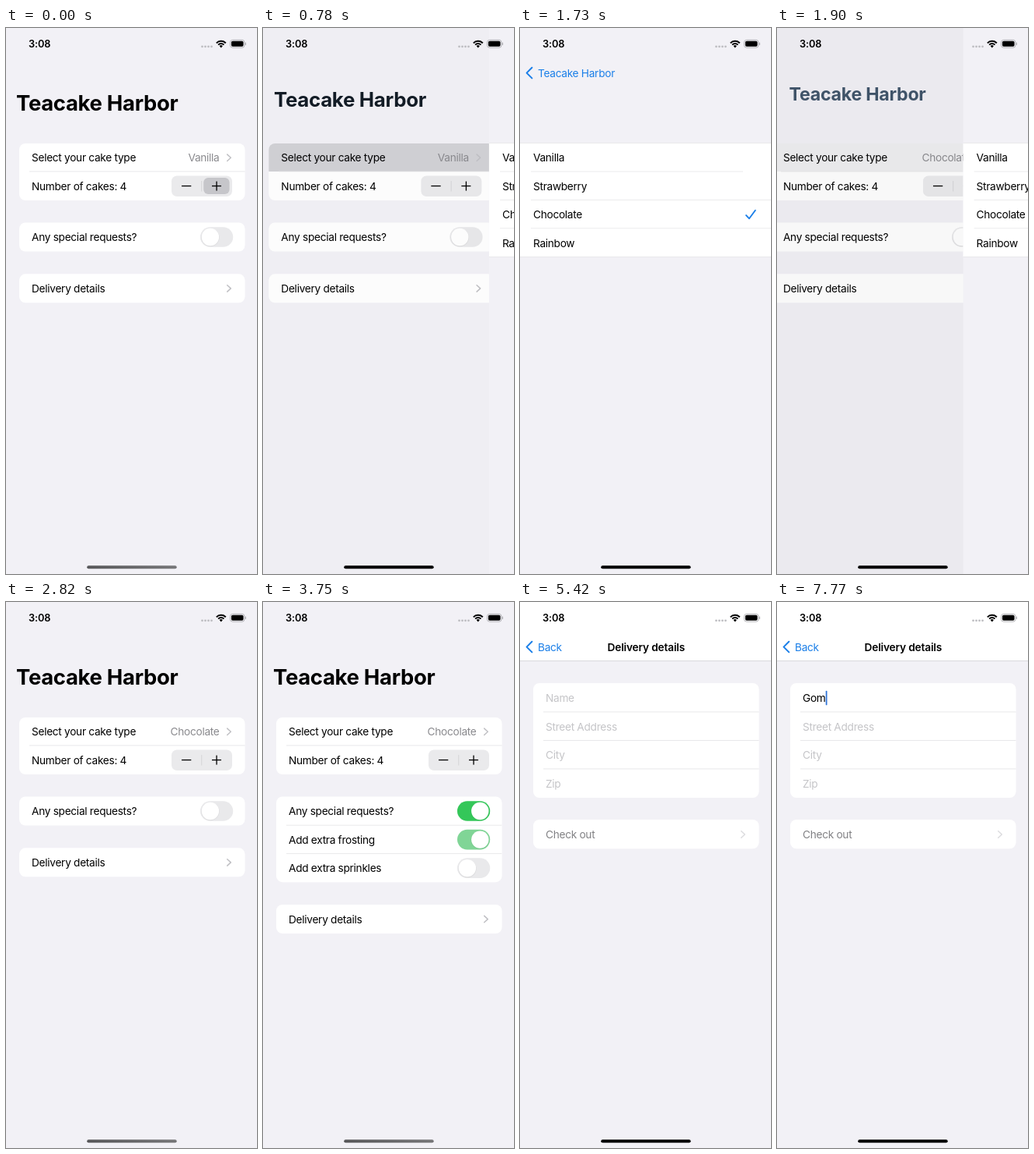
These frames come from a looping animation (323x700 px, 8 s). An HTML page with a canvas:

```html
<!DOCTYPE html>
<html lang="en">
<head>
<meta charset="utf-8">
<title>Cake order form</title>
<style>
html, body { margin: 0; width: 100%; height: 100%; overflow: hidden; background: #f2f1f6; }
canvas { display: block; width: 323px; height: 700px; }
</style>
</head>
<body>
<canvas></canvas>
<script>
const W = 323, H = 700, LOOP = 8000;
const BG = '#f2f1f6', LINE = '#e6e6e8', GRAY = '#8a8a8e', PALE = '#c5c5c8', PRESSED = '#d1d1d6', BLUE = '#1b7fe8';
const SHOP = 'Teacake Harbor', NAME = 'Gom';
const PUSH_TYPES = 752, POP_TYPES = 1756, PUSH_DETAILS = 4905;
const canvas = document.querySelector('canvas'), c = canvas.getContext('2d');
const dpr = window.devicePixelRatio || 1;
canvas.width = W * dpr;
canvas.height = H * dpr;

const clamp = v => Math.max(0, Math.min(1, v));
const ramp = (t, from, to) => clamp((t - from) / (to - from));
const ease = v => v * v * (3 - 2 * v);
const mix = (a, b, k) => a + (b - a) * k;

// Critically damped spring: share of the way still left after ms.
function springLeft(ms) {
  const x = Math.max(0, ms) * 0.01826;
  return (1 + x) * Math.exp(-x);
}

function faded(alpha, draw) {
  c.save();
  c.globalAlpha *= clamp(alpha);
  draw();
  c.restore();
}

function shifted(x, draw) {
  c.save();
  c.translate(x, 0);
  draw();
  c.restore();
}

function rect(x, y, w, h, color) {
  c.fillStyle = color;
  c.fillRect(x, y, w, h);
}

function box(x, y, w, h, r, color) {
  c.fillStyle = color;
  c.beginPath();
  c.roundRect(x, y, w, h, r);
  c.fill();
}

function disc(x, y, r, color) {
  c.fillStyle = color;
  c.beginPath();
  c.arc(x, y, r, 0, 7);
  c.fill();
}

function stroke(points, color, width) {
  c.strokeStyle = color;
  c.lineWidth = width;
  c.lineCap = c.lineJoin = 'round';
  c.beginPath();
  points.forEach(([x, y]) => c.lineTo(x, y));
  c.stroke();
}

// y is the middle of the capital letters.
function text(s, x, y, { color = '#000', size = 13.7, weight = 400, align = 'left' } = {}) {
  c.font = `${weight} ${size}px Inter, "Liberation Sans", sans-serif`;
  c.letterSpacing = (weight === 400 ? -0.022 : -0.012) * size + 'px';
  c.textAlign = align;
  c.fillStyle = color;
  c.fillText(s, x, y + size * 0.364);
  return c.measureText(s).width;
}

const card = (y, h) => box(17, y, 290.5, h, 8, '#fff');
const line = y => rect(30, y, 277.5, 0.9, LINE);
const chevron = (y, color = '#c0c0c4') => stroke([[284.7, y - 4.2], [289.3, y], [284.7, y + 4.2]], color, 1.5);

function toggle(y, knob, tint) {
  const color = `rgb(${mix(233, 52, tint)},${mix(233, 199, tint)},${mix(235, 89, tint)})`;
  box(250, y - 12.85, 42.2, 25.7, 12.85, color);
  const x = mix(262.9, 279.3, knob);
  disc(x, y + 0.6, 11.7, 'rgba(0,0,0,.06)');
  disc(x, y, 11.2, '#fff');
}

function stepper(pressed) {
  box(213, 189.5, 78, 26.5, 7, '#eaeaec');
  if (pressed) box(254.2, 192, 33.4, 21, 6, '#c6c6ca');
  rect(251.3, 196, 0.9, 13.5, '#d2d2d5');
  rect(226, 201.9, 12.3, 1.3, '#000');
  rect(265, 201.9, 12, 1.3, '#000');
  rect(270.4, 196.6, 1.3, 12, '#000');
}

function drawForm(t, typePress, detailsPress) {
  const open = ease(ramp(t, 2820, 3130));
  rect(-W, 0, 3 * W, H, BG);

  card(148, 73);
  if (typePress) faded(typePress, () => box(17, 148, 290.5, 36, [8, 8, 0, 0], PRESSED));
  line(183.5);
  text('Select your cake type', 33, 166.3);
  text(t < 1730 ? 'Vanilla' : 'Chocolate', 274.5, 166.3, { color: GRAY, align: 'right' });
  chevron(166.3);
  text('Number of cakes: 4', 33, 202.7);
  stepper(t < 690);

  const height = mix(37, 109.7, open);
  card(249.5, height);
  text('Any special requests?', 33, 268.2);
  toggle(268, ease(ramp(t, 2820, 3000)), 0.6 * ramp(t, 2820, 3080) + 0.4 * ramp(t, 3590, 3750));
  if (open) faded(open, () => {
    c.beginPath();
    c.rect(17, 249.5, 290.5, height);
    c.clip();
    line(285.7);
    text('Add extra frosting', 33, 304.8);
    toggle(304.6, ease(ramp(t, 3590, 3750)), 0.58 * ramp(t, 3590, 3750));
    line(322.2);
    text('Add extra sprinkles', 33, 341.3);
    toggle(341.1, 0, 0);
  });

  const y = mix(315.3, 388, open);
  card(y, 37);
  if (detailsPress) box(17, y, 290.5, 37, 8, PRESSED);
  text('Delivery details', 33, y + 18.6);
  chevron(y + 18.6);
}

function drawTypes(t) {
  rect(0, 0, W, H, BG);
  rect(0, 147.5, W, 146, '#fff');
  rect(0, 147.2, W, 0.8, LINE);
  rect(0, 293, W, 0.8, LINE);
  ['Vanilla', 'Strawberry', 'Chocolate', 'Rainbow'].forEach((label, i) => {
    text(label, 17, 166.4 + i * 36.4);
    if (i) rect(14, 147.2 + i * 36.4, i === 1 ? 273 : W, 0.8, LINE);
  });
  const y = t < 1730 ? 166.3 : 239.1;
  stroke([[291, y + 1], [295, y + 5.2], [302.8, y - 5.3]], BLUE, 1.9);
}

function drawDetails(t) {
  rect(0, 0, W, H, BG);
  rect(0, 0, W, 75, '#fff');
  rect(0, 75, W, 0.8, '#d4d4d8');
  card(104, 147);
  const typed = NAME.slice(0, [7420, 7710, 7770].filter(start => t >= start).length);
  let typedWidth = 0;
  ['Name', 'Street Address', 'City', 'Zip'].forEach((label, i) => {
    const y = 123.2 + i * 36.5;
    if (i) line(y - 19.2);
    if (!i && typed) typedWidth = text(typed, 33, y);
    else text(label, 33, y, { color: PALE });
  });
  if (t >= 6140) {
    const blink = 1 - ramp(t, 6710, 6830) + ramp(t, 7060, 7190);
    faded(blink, () => box(33.2 + typedWidth, 113.7, 1.8, 18.6, 0.9, '#2f74d8'));
  }
  card(279, 37.3);
  text('Check out', 33, 298.2, { color: '#828285' });
  chevron(298, '#dcdcdf');
}

function drawBar(typesOpen, detailsOpen) {
  const open = Math.max(typesOpen, detailsOpen), left = 1 - open;
  faded(1 - clamp(open / 0.7) ** 1.4, () => text(SHOP, 13 + 10 * open, 96 - 44 * open, {
    size: 27.5 * (1 - 0.6 * open), weight: 700,
    color: `rgb(${27 * open},${127 * open},${232 * open})`
  }));
  if (!open) return;
  faded(1 - left / 0.45, () => text(detailsOpen ? 'Back' : SHOP, 23 + 34 * left, 57.6 + 42 * left,
    { size: 13.7 * (1 + 1.1 * left), color: BLUE }));
  faded((0.25 - left) / 0.2, () => shifted(66 * left, () =>
    stroke([[15.4, 50.8], [8.6, 57.6], [15.4, 64.4]], BLUE, 2)));
  if (detailsOpen) faded(detailsOpen, () =>
    text('Delivery details', 162.3 + 231 * left, 57.6, { weight: 600, align: 'center' }));
}

function drawStatus(t) {
  text('3:08', 43.2, 20.4, { size: 12.8, weight: 600, align: 'center' });
  for (let i = 0; i < 4; i++) disc(252.5 + i * 4, 23.8, 1.4, '#bdbdc1');

  c.strokeStyle = '#000';
  c.lineCap = 'butt';
  c.lineWidth = 2;
  for (const r of [8.2, 5]) {
    c.beginPath();
    c.arc(276.8, 25, r, -Math.PI * 0.76, -Math.PI * 0.24);
    c.stroke();
  }
  c.fillStyle = '#000';
  c.beginPath();
  c.moveTo(276.8, 25.4);
  c.arc(276.8, 25, 2.9, -Math.PI * 0.76, -Math.PI * 0.24);
  c.fill();

  c.strokeStyle = '#acacb0';
  c.lineWidth = 0.9;
  c.beginPath();
  c.roundRect(288.5, 15.4, 18.4, 9.8, 3);
  c.stroke();
  box(289.9, 16.8, 15.6, 7, 1.8, '#000');
  box(307.7, 18.6, 1.2, 3.4, 0.6, '#acacb0');

  let color = '#000';
  if (t < 690 || (t >= 2820 && t < 4800)) {
    color = c.createLinearGradient(104, 0, 220, 0);
    color.addColorStop(0, '#58585a');
    color.addColorStop(1, '#777779');
  }
  box(104.2, 689.2, 115.5, 4.1, 2.05, color);
}

function draw(t) {
  const typesOpen = t < PUSH_TYPES || t >= 2270 ? 0
    : t < POP_TYPES ? 1 - springLeft(t - PUSH_TYPES) : springLeft(t - POP_TYPES);
  const detailsOpen = t < PUSH_DETAILS ? 0 : t < 5420 ? 1 - springLeft(t - PUSH_DETAILS) : 1;
  const open = Math.max(typesOpen, detailsOpen);
  const typePress = t < 690 || t >= 2270 ? 0 : t < POP_TYPES ? 1 : clamp(typesOpen * 1.35);

  c.setTransform(dpr, 0, 0, dpr, 0, 0);
  shifted(-97 * open, () => drawForm(t, typePress, t >= 4800));
  if (open) rect(0, 0, W, H, `rgba(0,0,0,${0.1 * open})`);
  if (typesOpen) shifted(W * (1 - typesOpen), () => drawTypes(t));
  if (detailsOpen) shifted(W * (1 - detailsOpen), () => drawDetails(t));
  drawBar(typesOpen, detailsOpen);
  drawStatus(t);
}

const start = performance.now();
function tick() {
  draw((performance.now() - start) % LOOP);
  requestAnimationFrame(tick);
}
tick();
</script>
</body>
</html>
```
